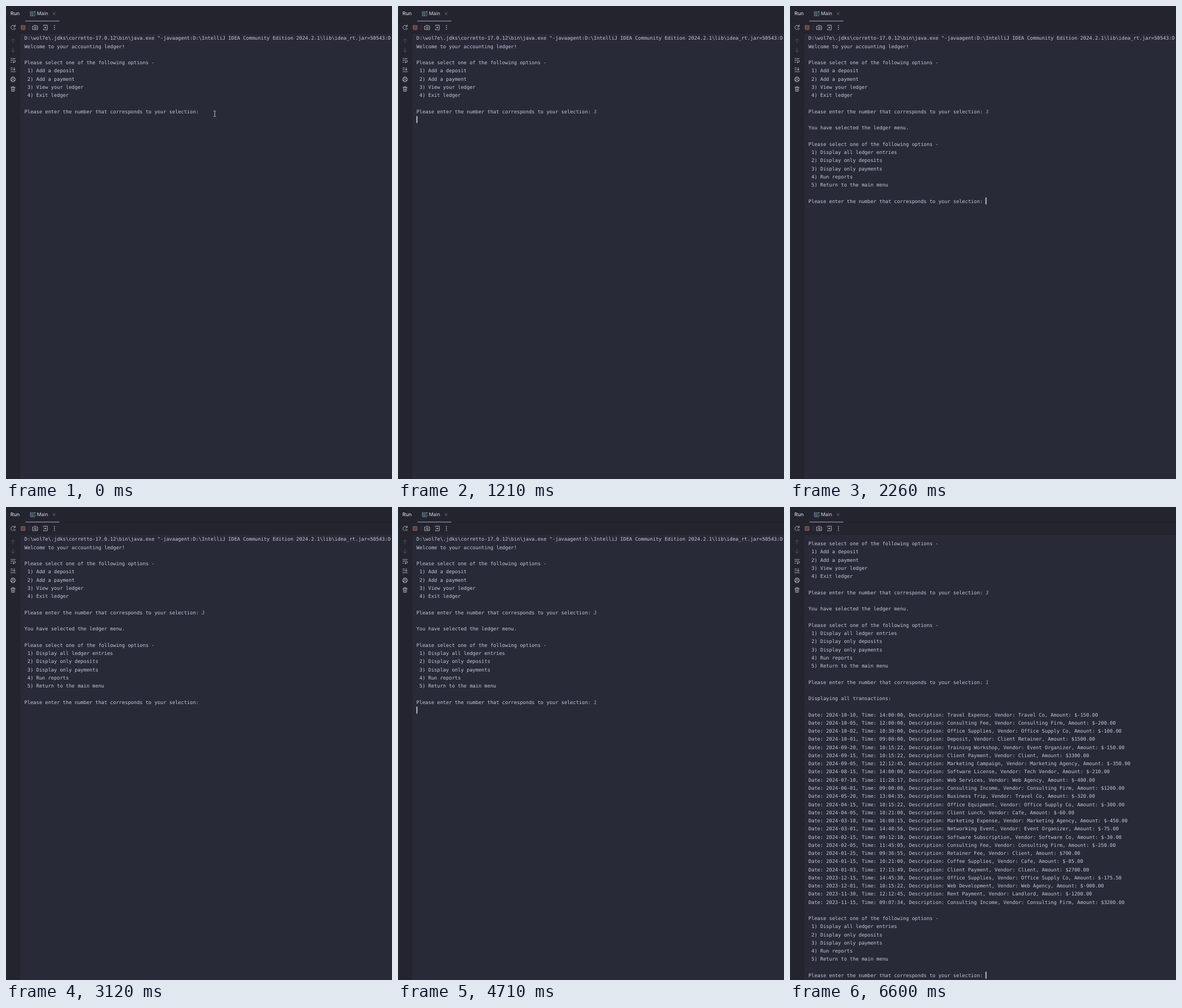
An HTML page for the animation above (7130 ms loop, 676x828 px).

```html
<!DOCTYPE html>
<html lang="en">
<head>
<meta charset="utf-8">
<title>Ledger console</title>
<style>
  html, body { margin: 0; width: 100%; height: 100%; overflow: hidden; background: #292a37; }
  svg { display: block; }
  .lines text {
    font: 8.609px "DejaVu Sans Mono", "Noto Sans Mono", monospace;
    fill: #c6c8da;
    white-space: pre;
    text-rendering: geometricPrecision;
  }
  .lines .typed { font-style: italic; fill: #a3a4b0; }
  .ui { font: 8.7px Inter, sans-serif; fill: #d5d6e0; text-rendering: geometricPrecision; }
  .title { font-weight: 500; }
  .icon { fill: none; stroke: #b9bac8; stroke-width: .9; stroke-linecap: round; stroke-linejoin: round; }
  .dim { stroke: #555662; }

  /* One loop is 7130 ms; every state change is a hard cut. */
  #caret, #pick, #menu, #pick2, #ledger, #scroll, #pointer { animation: 7130ms step-end infinite; }
  #caret { animation-name: caret; }
  #pick { animation-name: pick; }
  #menu { animation-name: menu; }
  #pick2 { animation-name: pick2; }
  #ledger { animation-name: ledger; }
  #scroll { animation-name: scroll; }
  #pointer { animation-name: pointer; }

  @keyframes pick { 0% { opacity: 0 } 15.989%, 100% { opacity: 1 } }
  @keyframes menu { 0% { opacity: 0 } 31.697%, 100% { opacity: 1 } }
  @keyframes pick2 { 0% { opacity: 0 } 66.059%, 100% { opacity: 1 } }
  @keyframes ledger { 0% { opacity: 0 } 71.669%, 100% { opacity: 1 } }
  @keyframes scroll { 0% { transform: none } 71.669%, 100% { transform: translateY(-35px) } }
  @keyframes caret {
    0% { opacity: 0; transform: translate(342.4px, 178.4px) }
    7.714% { opacity: 1; transform: translate(342.4px, 178.4px) }
    14.165% { opacity: 0; transform: translate(342.4px, 178.4px) }
    15.989% { opacity: 1; transform: translate(32.3px, 192.7px) }
    31.697% { opacity: 1; transform: translate(342.4px, 335.2px) }
    37.307% { opacity: 0; transform: translate(342.4px, 335.2px) }
    45.582% { opacity: 1; transform: translate(342.4px, 335.2px) }
    51.192% { opacity: 0; transform: translate(342.4px, 335.2px) }
    59.467% { opacity: 1; transform: translate(342.4px, 335.2px) }
    66.059% { opacity: 1; transform: translate(32.3px, 349.5px) }
    71.669% { opacity: 1; transform: translate(342.4px, 848.6px) }
    78.261% { opacity: 0; transform: translate(342.4px, 848.6px) }
    90.743%, 100% { opacity: 1; transform: translate(342.4px, 848.6px) }
  }
  @keyframes pointer {
    0% { opacity: 1; transform: none }
    .982% { opacity: 1; transform: none; animation-timing-function: steps(7, start) }
    7.714%, 100% { opacity: 0; transform: translate(320px, 24px) }
  }
</style>
</head>
<body>
<svg width="676" height="828" viewBox="0 0 676 828">
  <rect width="676" height="828" fill="#292a37"/>
  <g id="scroll" class="lines">
    <g id="start"></g>
    <g id="pick"></g>
    <g id="menu"></g>
    <g id="pick2"></g>
    <g id="ledger"></g>
    <rect id="caret" width="1.5" height="12" fill="#e9e9ef"/>
  </g>
  <path id="pointer" d="M363.4 183.6q2 0 2.2 1q.2-1 2.2-1M365.6 184.6v8M363.4 193.6q2 0 2.2-1q.2 1 2.2 1" fill="none" stroke="#d4d5dc" stroke-width=".9"/>

  <!-- tool window frame -->
  <path d="M0 0H676V49H25V828H0Z" fill="#24242f"/>
  <path d="M0 26.5H676" stroke="#1f2029"/>
  <path d="M34 26.3H93.5" stroke="#8d8ea3" stroke-width="1.2"/>
  <text class="ui title" x="7.8" y="16.1">Run</text>
  <text class="ui" x="54" y="16.1">Main</text>
  <path class="icon" d="M82.2 11.6l3.8 3.8M86 11.6l-3.8 3.8" style="stroke:#777885"/>

  <!-- tab icon -->
  <g class="icon" style="stroke:#7190ad">
    <path d="M48 10H42.6V17.2H50.6V13M42.6 12H48M44.4 14h1.6M47 14h1.6M44.4 15.6h3"/>
    <circle cx="50.3" cy="10.2" r="1.3" style="fill:#639b72;stroke:none"/>
  </g>

  <!-- toolbar -->
  <g class="icon">
    <path d="M15.6 35.1A3.9 3.9 0 1 0 12 41.5M16.2 33.2V35.9H13.5"/>
    <path d="M14.2 38.4l2.8 1.6l-2.8 1.6Z" style="stroke:#7f8d86"/>
    <rect x="26.4" y="34.2" width="7" height="7" rx=".8" style="fill:#60423f;stroke:#9a6b62"/>
    <path d="M40.5 33.5V42" style="stroke:#41424e"/>
    <path d="M46.8 35.2H48.8L49.7 33.8H52.5L53.4 35.2H55.4V41.2H46.8Z"/>
    <circle cx="51.1" cy="38" r="1.6"/>
    <path d="M65.7 35V33.5H72.3V41.7H65.7V40.2M66.8 37.6H70M68.7 36.2L70.1 37.6L68.7 39"/>
  </g>
  <g fill="#c6c7d2">
    <circle cx="84.8" cy="34.4" r=".85"/>
    <circle cx="84.8" cy="37.6" r=".85"/>
    <circle cx="84.8" cy="40.8" r=".85"/>
  </g>

  <!-- side buttons -->
  <g class="icon">
    <path class="dim" d="M12.3 64.8V57.4M9.3 60.4l3-3l3 3"/>
    <path class="dim" d="M12.3 73.6V81M9.3 78l3 3l3-3"/>
    <path d="M8.4 92H16.4M8.4 95H14.8a1.6 1.6 0 0 1 0 3.4H12.4M13.6 97l-1.4 1.4l1.4 1.4M8.4 98.4H10"/>
    <path d="M8.4 108.4H11.4M8.4 111.4H11.4M8.4 115H16.4M14.4 107.6V112.6M12.6 110.9l1.8 1.8l1.8-1.8"/>
    <path d="M10.2 126.4V124.2H14.4V126.4M10 130.6H8.4V126.4H16.2V130.6H14.6M10.2 129.2H14.4V132.4H10.2Z"/>
    <path d="M8.6 142.6H16M10.8 142.4V141.2H13.8V142.4M9.5 142.8L9.9 149.4H14.7L15.1 142.8M11.4 144.8V147.4M13.2 144.8V147.4"/>
  </g>
</svg>
<script>
  const LEFT = 32.3, FIRST_BASE = 59.4, PITCH = 14.26;
  const PROMPT = "Please enter the number that corresponds to your selection: ";
  const CHOOSE = "Please select one of the following options -";

  function print(id, row, lines, cls = "") {
    const group = document.getElementById(id);
    lines.forEach((line, i) => {
      if (!line) return;
      const text = document.createElementNS("http://www.w3.org/2000/svg", "text");
      text.setAttribute("x", LEFT);
      text.setAttribute("y", FIRST_BASE + PITCH * (row + i));
      text.setAttribute("class", cls);
      text.textContent = line;
      group.append(text);
    });
  }

  const options = (...names) =>
    [CHOOSE, ...names.map((name, i) => ` ${i + 1}) ${name}`), "", PROMPT];
  const typed = (id, row, key) =>
    print(id, row, [" ".repeat(PROMPT.length) + key], "typed");

  const ledgerMenu = options("Display all ledger entries", "Display only deposits",
    "Display only payments", "Run reports", "Return to the main menu");

  // date | time | description | vendor | amount
  const entries = `2024-10-10|14:00:00|Travel Expense|Travel Co|-150.00
2024-10-05|12:00:00|Consulting Fee|Consulting Firm|-200.00
2024-10-02|10:30:00|Office Supplies|Office Supply Co|-100.00
2024-10-01|09:00:00|Deposit|Client Retainer|1500.00
2024-09-20|10:15:22|Training Workshop|Event Organizer|-150.00
2024-09-15|10:15:22|Client Payment|Client|3300.00
2024-09-05|12:12:45|Marketing Campaign|Marketing Agency|-350.00
2024-08-15|14:00:00|Software License|Tech Vendor|-210.00
2024-07-10|11:28:17|Web Services|Web Agency|-400.00
2024-06-01|09:00:00|Consulting Income|Consulting Firm|1200.00
2024-05-20|13:04:35|Business Trip|Travel Co|-320.00
2024-04-15|10:15:22|Office Equipment|Office Supply Co|-300.00
2024-04-05|10:21:00|Client Lunch|Cafe|-60.00
2024-03-10|16:08:15|Marketing Expense|Marketing Agency|-450.00
2024-03-01|14:48:56|Networking Event|Event Organizer|-75.00
2024-02-15|09:12:10|Software Subscription|Software Co|-30.00
2024-02-05|11:45:05|Consulting Fee|Consulting Firm|-250.00
2024-01-25|09:36:55|Retainer Fee|Client|700.00
2024-01-15|10:21:00|Coffee Supplies|Cafe|-85.00
2024-01-03|17:13:49|Client Payment|Client|2700.00
2023-12-15|14:45:30|Office Supplies|Office Supply Co|-175.50
2023-12-01|10:15:22|Web Development|Web Agency|-900.00
2023-11-30|12:12:45|Rent Payment|Landlord|-1200.00
2023-11-15|09:07:34|Consulting Income|Consulting Firm|3200.00`
    .split("\n").map(row => {
      const [date, time, what, vendor, amount] = row.split("|");
      return `Date: ${date}, Time: ${time}, Description: ${what}, Vendor: ${vendor}, Amount: $${amount}`;
    });

  print("start", 0, [
    String.raw`D:\wol7e\.jdks\corretto-17.0.12\bin\java.exe "-javaagent:D:\IntelliJ IDEA Community Edition 2024.2.1\lib\idea_rt.jar=50543:D`,
    "Welcome to your accounting ledger!",
    "",
    ...options("Add a deposit", "Add a payment", "View your ledger", "Exit ledger")
  ]);
  typed("pick", 9, "3");
  print("menu", 11, ["You have selected the ledger menu.", "", ...ledgerMenu]);
  typed("pick2", 20, "1");
  print("ledger", 22, ["Displaying all transactions:", "", ...entries, "", ...ledgerMenu]);
</script>
</body>
</html>
```
